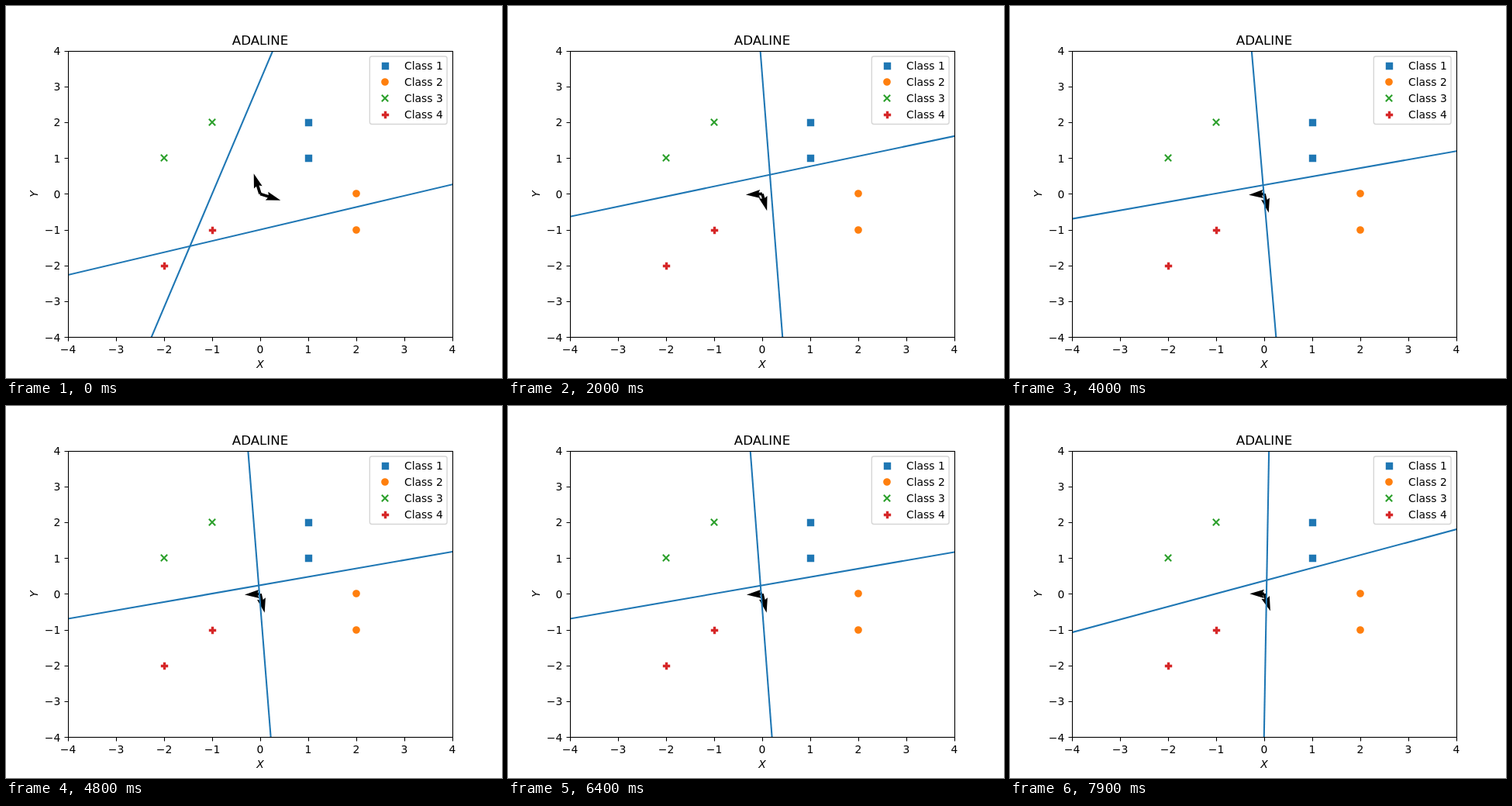
These frames come from a looping animation (640x480 px, 8000 ms). An HTML page:

```html
<!DOCTYPE html>
<html lang="en">
<head>
<meta charset="utf-8">
<title>ADALINE</title>
<style>
  html, body { margin: 0; width: 100%; height: 100%; overflow: hidden; background: #fff; }
  svg { display: block; width: 640px; height: 480px; }
  text { font: 13.89px "DejaVu Sans", sans-serif; fill: #000; }
  .title { font-size: 16.67px; }
  .mid { text-anchor: middle; }
  .end { text-anchor: end; }
  .axis { font-style: italic; }
  .frame { fill: none; stroke: #000; stroke-width: 1.111; }
  .bound { stroke: #1f77b4; stroke-width: 2.083; }
</style>
</head>
<body>
<svg id="stage" viewBox="0 0 640 480">
  <defs><clipPath id="box"><rect x="80" y="58" width="496" height="369"/></clipPath></defs>
  <rect width="640" height="480" fill="#fff"/>
  <g id="points"></g>
  <g id="arrows"></g>
  <g id="bounds" clip-path="url(#box)"></g>
  <g id="axes"></g>
  <text class="title mid" x="328" y="50">ADALINE</text>
  <text class="axis mid" x="328" y="467">X</text>
  <text class="axis mid" transform="translate(40.5 242.5) rotate(-90)">Y</text>
  <g id="legend">
    <rect x="469.3" y="65" width="99.8" height="87.5" rx="2.8"
      fill="#fff" stroke="#ccc" stroke-width="1.389" opacity=".8"/>
  </g>
</svg>
<script>
const STEP = 100, STEPS = 80, RATE = 0.04;
const ARROW_SCALE = 34.57, ARROW_WIDTH = 3.72;

const samples = [[1, 1], [1, 2], [2, -1], [2, 0], [-1, 2], [-2, 1], [-1, -1], [-2, -2]];
const targets = [[-1, -1], [-1, 1], [1, -1], [1, 1]];   // one pair per class

const px = x => 328 + 62 * x;
const py = y => 242.4 - 46.2 * y;
const byId = id => document.getElementById(id);

function add(parent, tag, attrs, content) {
  const el = document.createElementNS("http://www.w3.org/2000/svg", tag);
  for (const key in attrs) el.setAttribute(key, attrs[key]);
  if (content) el.textContent = content;
  return parent.appendChild(el);
}

// Markers, centred on whole pixels
const filled = color => ({ fill: color, stroke: color, "stroke-width": 1.389 });
const markers = [
  { d: "M-3.5-3.5h8v8h-8z", ...filled("#1f77b4") },
  { d: "M-4.167 0a4.167 4.167 0 1 0 8.334 0a4.167 4.167 0 1 0-8.334 0z", ...filled("#ff7f0e") },
  { d: "M-4.167-4.167L4.167 4.167M-4.167 4.167L4.167-4.167",
    fill: "none", stroke: "#2ca02c", "stroke-width": 2.083 },
  { d: "M-.5-3.5h2v3h3v2h-3v3h-2v-3h-3v-2h3z", ...filled("#d62728") }
];

function addMarker(parent, kind, x, y) {
  const transform = `translate(${Math.round(x)} ${Math.round(y)})`;
  add(parent, "path", { ...markers[kind], transform });
}

samples.forEach(([x, y], i) => addMarker(byId("points"), i >> 1, px(x), py(y)));

markers.forEach((_, i) => {
  const y = 77 + 21 * i;
  addMarker(byId("legend"), i, 489, y);
  add(byId("legend"), "text", { x: 514, y: y + 5 }, "Class " + (i + 1));
});

// Frame, ticks and tick labels
const axes = byId("axes");
add(axes, "rect", { class: "frame", x: 80.5, y: 58.5, width: 496, height: 369 });
for (let k = -4; k <= 4; k++) {
  const label = (k < 0 ? "\u2212" : "") + Math.abs(k);
  const x = Math.round(px(k)) + 0.5, y = Math.round(py(k)) + 0.5;
  add(axes, "path", { class: "frame", d: `M${x} 427.5v5M80.5 ${y}h-5` });
  add(axes, "text", { class: "mid", x: px(k), y: 448 }, label);
  add(axes, "text", { class: "end", x: 70.3, y: Math.round(py(k) + 5.3) }, label);
}

// Least-mean-squares training: each neuron is [wx, wy, bias]
function train() {
  let neurons = [[1, 0, 1], [0, 1, 1]];
  const history = [];
  for (let n = 0; n < STEPS; n++) {
    const i = n % samples.length;
    const [x, y] = samples[i];
    neurons = neurons.map(([u, v, b], row) => {
      const delta = 2 * RATE * (targets[i >> 1][row] - (u * x + v * y + b));
      return [u + delta * x, v + delta * y, b + delta];
    });
    history.push(neurons);
  }
  return history;
}

// Arrow outline pointing right; short arrows shrink as a whole
function arrowPath(pixels) {
  const length = pixels / ARROW_WIDTH;
  const full = Math.max(length, 5);
  const s = ARROW_WIDTH * length / full;
  const half = [[0, 0.5], [full - 4.5, 0.5], [full - 5, 1.5]];
  const other = half.map(([x, y]) => [x, -y]).reverse();
  const outline = [...half, [full, 0], ...other];
  return "M" + outline.map(([x, y]) => `${x * s} ${y * s}`).join("L") + "z";
}

const history = train();
const arrows = [0, 1].map(() => add(byId("arrows"), "path", {}));
const bounds = [0, 1].map(() => add(byId("bounds"), "line", { class: "bound" }));

function drawNeuron([u, v, b], i) {
  const size = Math.hypot(u, v);
  const angle = Math.atan2(-v, u) * 180 / Math.PI;
  arrows[i].setAttribute("d", arrowPath(size * ARROW_SCALE));
  arrows[i].setAttribute("transform", `translate(${px(0)} ${py(0)}) rotate(${angle})`);

  const x = -b * u / size ** 2, y = -b * v / size ** 2;
  const dx = -v / size * 15, dy = u / size * 15;
  const ends = { x1: px(x - dx), y1: py(y - dy), x2: px(x + dx), y2: py(y + dy) };
  for (const key in ends) bounds[i].setAttribute(key, ends[key]);
}

let start = null, shown = -1;
function tick(now) {
  if (start === null) start = now;
  const step = Math.floor((now - start) / STEP) % STEPS;
  if (step !== shown) history[step].forEach(drawNeuron);
  shown = step;
  requestAnimationFrame(tick);
}
history[0].forEach(drawNeuron);
requestAnimationFrame(tick);
</script>
</body>
</html>
```
